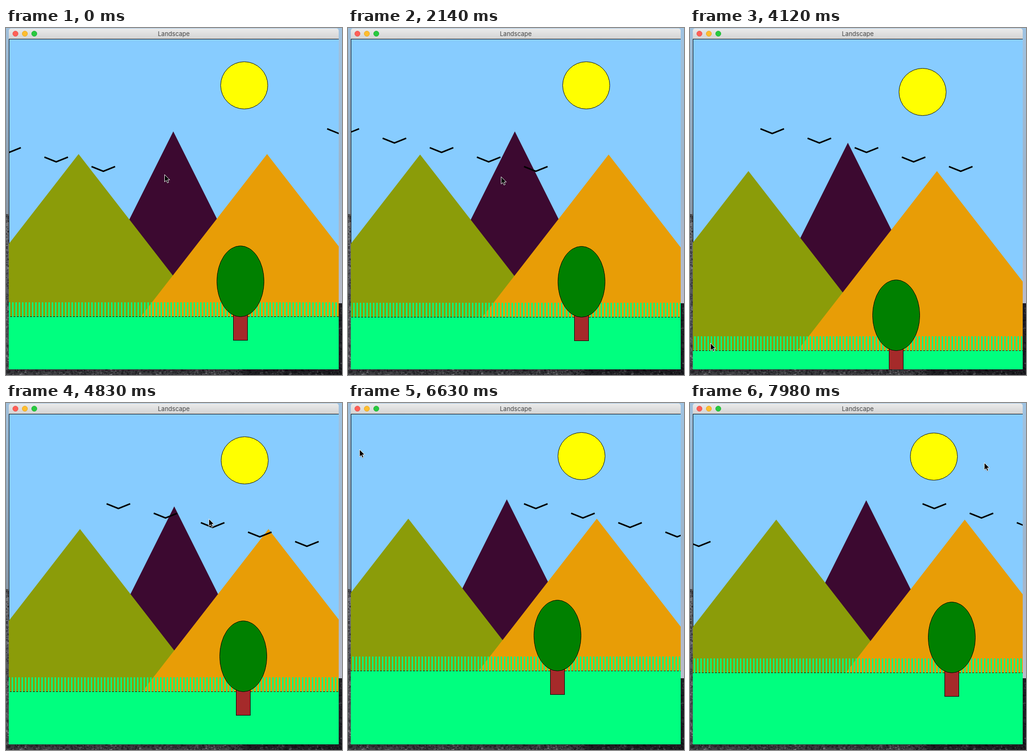
These frames come from a looping animation (713 px wide and 735 px high, 8000 ms). An HTML page with a canvas:

```html
<!DOCTYPE html>
<html lang="en">
<head>
<meta charset="utf-8">
<title>Landscape</title>
<style>
  html, body { margin: 0; width: 100%; height: 100%; overflow: hidden; }
  canvas { display: block; }
</style>
</head>
<body>
<canvas id="stage" width="713" height="735"></canvas>
<script>
const W = 713, H = 735, LOOP = 8000, LAST = 89;
const stage = document.getElementById('stage');
const ctx = stage.getContext('2d');

// Pointer path: step, x, y
const HOME = { x: 336, y: 310 };
const PATH = [
  [0, 336, 310], [17, 336, 310], [21, 330, 311], [28, 314, 325],
  [32, 286, 360], [33, 272, 370], [37, 186, 485], [43, 25, 682],
  [45, 36, 670], [46, 43, 667], [48, 88, 615], [56, 540, 150],
  [59, 655, 84], [61, 646, 75], [62, 619, 79], [67, 380, 84],
  [73, 71, 90], [74, 24, 98], [75, 8, 103], [80, 330, 135],
  [83, 510, 100], [86, 622, 92], [88, 626, 110], [89, 624, 126]
];

// Monotone cubic through the path; c selects x (1) or y (2)
function along(n, c) {
  const last = PATH.length - 1;
  if (n <= 0) return PATH[0][c];
  if (n >= LAST) return PATH[last][c];
  let i = 0;
  while (PATH[i + 1][0] <= n) i++;
  const slope = k => (PATH[k + 1][c] - PATH[k][c]) / (PATH[k + 1][0] - PATH[k][0]);
  const tangent = k => {
    if (k === 0) return 0;
    if (k === last) return slope(k - 1);
    const a = slope(k - 1), b = slope(k);
    return a * b <= 0 ? 0 : 2 * a * b / (a + b);
  };
  const h = PATH[i + 1][0] - PATH[i][0];
  const s = (n - PATH[i][0]) / h, r = 1 - s;
  return PATH[i][c] * (1 + 2 * s) * r * r + tangent(i) * h * s * r * r
    + PATH[i + 1][c] * s * s * (3 - 2 * s) - tangent(i + 1) * h * s * s * r;
}

const pointer = n => ({ x: along(n, 1), y: along(n, 2) });

// Steps last 90 ms, three of them 80 ms
const startOf = n => 90 * n - 10 * ((n >= 6) + (n >= 14) + (n >= 53));

function stepAt(t) {
  let n = LAST;
  while (n > 0 && startOf(n) > t) n--;
  return n;
}

function poly(g, points, fill) {
  g.beginPath();
  points.forEach(([x, y]) => g.lineTo(x, y));
  g.closePath();
  g.fillStyle = fill;
  g.fill();
}

function oval(x, y, rx, ry, fill) {
  ctx.beginPath();
  ctx.ellipse(x, y, rx, ry, 0, 0, 2 * Math.PI);
  ctx.fillStyle = fill;
  ctx.fill();
  ctx.stroke();
}

function box(x, y, w, h, fill) {
  ctx.fillStyle = fill;
  ctx.fillRect(x, y, w, h);
  ctx.strokeRect(x, y, w, h);
}

function gradient(g, y0, y1, ...colors) {
  const fill = g.createLinearGradient(0, y0, 0, y1);
  colors.forEach((c, i) => fill.addColorStop(i / (colors.length - 1), c));
  return fill;
}

function makeBackdrop() {
  const layer = document.createElement('canvas');
  layer.width = W;
  layer.height = H;
  const g = layer.getContext('2d');
  let seed = 7;
  const rand = () => (seed = seed * 16807 % 2147483647) / 2147483647;
  const speckle = (x, y, w, h, count, low, high) => {
    for (let i = 0; i < count; i++) {
      const v = Math.round(low + (high - low) * rand() * rand());
      g.fillStyle = `rgb(${v},${v},${v + 5})`;
      g.fillRect(x + rand() * w, y + rand() * h, 1 + rand() * 4, 1 + rand() * 3);
    }
  };

  // Desktop around the window
  g.fillStyle = gradient(g, 0, 585, '#9fc3e2', '#9db5cc', '#b9bccb');
  g.fillRect(0, 0, W, H);
  g.fillStyle = gradient(g, 0, 400, '#a0c0dc', '#8795a4');
  g.fillRect(0, 0, 6, 400);
  g.fillStyle = gradient(g, 392, H, '#777a7f', '#55575c', '#45474c');
  g.fillRect(0, 394, 6, H - 394);
  speckle(-2, 394, 6, 341, 260, 50, 150);
  g.fillStyle = '#1e1c23';
  g.fillRect(706, 583, 7, 152);
  speckle(706, 586, 7, 149, 70, 12, 75);
  g.fillStyle = '#4b4b50';
  g.fillRect(0, 723, 500, 12);
  g.fillStyle = '#28272d';
  g.fillRect(500, 723, 213, 12);
  speckle(0, 723, 480, 12, 800, 35, 165);
  speckle(480, 723, 233, 12, 330, 15, 120);
  g.fillStyle = gradient(g, 723, 735, 'rgba(0,0,0,.35)', 'rgba(0,0,0,.12)');
  g.fillRect(0, 723, W, 12);

  // Title bar
  g.beginPath();
  g.roundRect(6, 1, 700, 30, 5);
  g.fillStyle = gradient(g, 1, 23, '#ebebeb', '#d3d3d3');
  g.fill();
  [['#ff5f57', '#e2463f'], ['#ffbd2e', '#e1a116'], ['#28c940', '#12ac28']].forEach(([fill, edge], i) => {
    g.beginPath();
    g.arc(20 + 20 * i, 12, 5.6, 0, 2 * Math.PI);
    g.fillStyle = fill;
    g.strokeStyle = edge;
    g.lineWidth = 0.8;
    g.fill();
    g.stroke();
  });
  g.fillStyle = '#444';
  g.font = '13px Inter, Roboto, sans-serif';
  g.textAlign = 'center';
  g.fillText('Landscape', 356, 17);
  return layer;
}

const backdrop = makeBackdrop();

function mountain(x, y, halfWidth, height, fill) {
  poly(ctx, [[x, y], [x + halfWidth, y + height], [x - halfWidth, y + height]], fill);
}

function drawBirds(n) {
  ctx.lineWidth = 3;
  ctx.lineJoin = 'round';
  for (let i = 0; i < 5; i++) {
    const x = (181.5 + 8 * n - 100 * i + 1000) % 900 - 100;
    const y = 293.5 - 20 * i;
    ctx.beginPath();
    ctx.moveTo(x, y);
    ctx.lineTo(x + 25, y + 10);
    ctx.lineTo(x + 50, y);
    ctx.stroke();
  }
}

function drawScene(n) {
  // The view follows the pointer one step late; far layers move less
  const p = pointer(n - 1);
  const u = Math.round((p.x - HOME.x) / 5);
  const v = Math.round((p.y - HOME.y) / 5);
  const dx = k => Math.floor((u + 3) / k) - Math.floor(3 / k);
  const dy = k => Math.floor((v + 1) / k);

  ctx.save();
  ctx.beginPath();
  ctx.rect(6, 23, 700, 700);
  ctx.clip();
  ctx.strokeStyle = '#000';
  ctx.lineWidth = 1;

  box(6.5, 23.5, 700, 700, '#87ccff');
  oval(505.5 + dx(5), 121.5 + dy(5), 50, 50, '#ffff00');
  mountain(355 + dx(3), 219 + dy(3), 300, 600, '#3c0930');
  mountain(154 + dx(2), 267 + dy(2), 350, 450, '#8b9c09');
  mountain(554 + dx(2), 267 + dy(2), 350, 450, '#e89d06');

  const ground = 611 + v;
  box(-200.5, ground + 0.5, 1200, 400, '#00ff7f');
  for (let x = 6 + u - 140; x < 706; x += 7) ctx.fillRect(x, ground - 30, 3, 31);

  box(482.5 + u, 601.5 + v, 30, 60, '#a52a2a');
  oval(497.5 + u, 536.5 + v, 50, 75, '#008000');
  drawBirds(n);
  ctx.restore();
}

const ARROW = [[0, 0], [0, 15.5], [3.6, 12.2], [6, 17.6], [8.6, 16.5], [6.3, 11.2], [11, 11.2]];

function drawPointer({ x, y }) {
  ctx.save();
  ctx.translate(x + 0.5, y + 0.5);
  ctx.shadowColor = 'rgba(0,0,0,.35)';
  ctx.shadowBlur = 2;
  ctx.shadowOffsetY = 1;
  poly(ctx, ARROW, '#000');
  ctx.shadowColor = 'transparent';
  ctx.strokeStyle = '#fff';
  ctx.lineWidth = 1;
  ctx.stroke();
  ctx.restore();
}

function draw(now) {
  const n = stepAt(now % LOOP);
  ctx.drawImage(backdrop, 0, 0);
  drawScene(n);
  drawPointer(pointer(n));
  requestAnimationFrame(draw);
}

draw(0);
</script>
</body>
</html>
```
